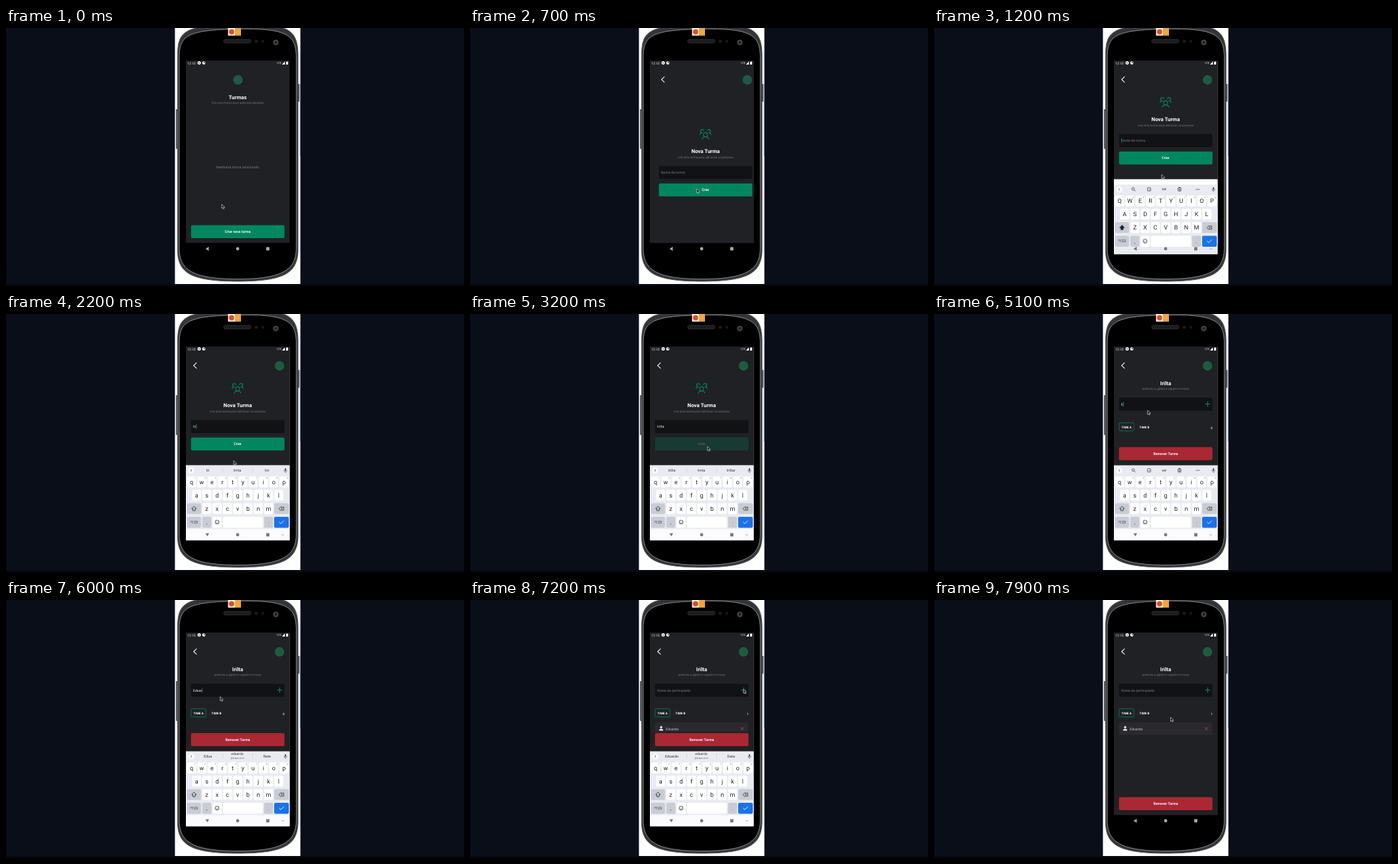
Recreate the animation shown at these times as an HTML page. Size 690x388 px, loop 8000 ms.

```html
<!DOCTYPE html>
<html lang="pt-BR">
<head>
<meta charset="utf-8">
<title>Turmas</title>
<style>
html, body { margin: 0; width: 100%; height: 100%; overflow: hidden; background: #0a0e18; }
svg { display: block; width: 100vw; height: 100vh; font-family: Roboto, Inter, sans-serif; text-rendering: geometricPrecision; }
</style>
</head>
<body>
<svg viewBox="0 0 690 388" preserveAspectRatio="none">
  <defs>
    <clipPath id="screen"><rect x="271" y="49" width="156.5" height="274.5"/></clipPath>
    <clipPath id="panel"><rect x="271" y="227.5" width="156.5" height="112.8"/></clipPath>
    <clipPath id="photo"><rect x="254.5" width="189" height="385"/></clipPath>
  </defs>
  <rect width="690" height="388" fill="#0a0e18"/>
  <rect y="385" width="690" height="3" fill="#060911"/>
  <g clip-path="url(#photo)">
    <rect x="254" width="190" height="385" fill="#fff"/>
    <rect x="256" y="122" width="2.600" height="60" rx="1" fill="#57575b"/>
    <rect x="439.500" y="84" width="2.400" height="27" rx="1" fill="#414145"/>
    <rect x="442.800" y="84" width="1" height="108" fill="#33353b"/>
    <path d="M258.500 40C259 5 268 -4 349 -6S439 5 440 40V335C439 368 420 381 349 381S259 368 258.500 335Z" fill="#343538" stroke="#5d5e62"/>
    <path d="M261 42C262 12 272 3 349 1.500S436 12 437.300 42V333C436 363 418 377.500 349 377.500S262 363 261 333Z" fill="#000" stroke="#98999c" stroke-width=".9"/>
  </g>
  <rect x="328" y="17" width="41" height="5.600" rx="2.800" fill="#1c1c1d" stroke="#38383a" stroke-width=".7"/>
  <g fill="#1b1b1d"><circle cx="377" cy="20" r="2.500"/><circle cx="387" cy="20" r="2"/></g>
  <circle cx="406.500" cy="21.700" r="3.700" fill="#3a3b3f" stroke="#55565a" stroke-width=".8"/>
  <circle cx="406.500" cy="21.700" r="1.600" fill="#19191c"/>
  <rect x="334.500" width="10.500" height="11.500" fill="#fff1e6"/>
  <circle cx="339.800" cy="5.700" r="4" fill="#d9502f"/>
  <rect x="345" width="9" height="11.500" fill="#f6a536"/>
  <g id="view"></g>
</svg>
<script>
const LOOP = 8000, STEP = 100, SCREEN_W = 157;
const GREEN = '#00875f', RED = '#aa2834', BG = '#202124', FIELD = '#121214';
const GROUP = 'Irilta', MEMBER = 'Eduardo';
const view = document.getElementById('view');
const ruler = document.createElement('canvas').getContext('2d');

const pointerPath = [
  [0, 325, 265], [400, 341, 304], [500, 341, 304], [800, 341.5, 220], [900, 341.5, 220],
  [1000, 343, 220.5], [2600, 343, 220.5], [3000, 357.7, 199.2], [3700, 357.7, 199.2],
  [4200, 321.7, 144.8], [5700, 321.7, 144.8], [5800, 322.7, 145.3], [6700, 322.7, 145.3],
  [7100, 412, 134], [7300, 412, 134], [7600, 393, 166], [7900, 356.5, 176.3], [8000, 356.5, 176.3]
];
// Moments at which each further letter appears.
const groupKeys = [1800, 2000, 2200, 2300, 2400, 2600];
const memberKeys = [5000, 5300, 5400, 5800, 6000, 6400, 6600];

const rect = (x, y, w, h, fill, rx = 0, extra = '') =>
  `<rect x="${x}" y="${y}" width="${w}" height="${h}" rx="${rx}" fill="${fill}" ${extra}/>`;
const circle = (x, y, r, fill, extra = '') => `<circle cx="${x}" cy="${y}" r="${r}" fill="${fill}" ${extra}/>`;
const line = (d, color, w = 1) =>
  `<path d="${d}" fill="none" stroke="${color}" stroke-width="${w}" stroke-linecap="round" stroke-linejoin="round"/>`;
const shape = (d, fill) => `<path d="${d}" fill="${fill}"/>`;
const group = (content, attrs) => `<g ${attrs}>${content}</g>`;
const shift = (x, y, content) => group(content, `transform="translate(${x} ${y})"`);

// y is the vertical centre of the capitals.
function text(s, x, y, size, fill, { anchor = 'middle', weight = 400 } = {}) {
  return `<text x="${x}" y="${y + size * 0.355}" font-size="${size}" fill="${fill}" text-anchor="${anchor}" font-weight="${weight}">${s}</text>`;
}
const left = { anchor: 'start' }, bold = { weight: 700 };

function typed(word, keys, t) {
  return word.slice(0, keys.filter(k => k <= t).length);
}

function caretOn(t, start, keys) {
  const last = [start, ...keys].filter(k => k <= t).pop();
  return last !== undefined && Math.floor((t - last) / 500) % 2 === 0;
}

// Offset of an incoming screen that decelerates for 300 ms.
const slide = (t, start) => SCREEN_W * (1 - Math.min(1, Math.max(0, (t - start) / 300))) ** 3;

function pointerAt(t) {
  const i = Math.max(1, pointerPath.findIndex(p => p[0] >= t));
  const [t0, x0, y0] = pointerPath[i - 1], [t1, x1, y1] = pointerPath[i];
  const p = (t - t0) / (t1 - t0), e = p * p * (3 - 2 * p);
  return [x0 + (x1 - x0) * e, y0 + (y1 - y0) * e];
}

const crest = x => circle(x, 78, 7.2, '#1d5b40');
const backArrow = line('M287 73.300L282.700 77.500L287 81.700', '#eee', 1.1);
const heading = (title, sub, y) => text(title, 349, y, 7.9, '#fff', bold) + text(sub, 349, y + 8.9, 4.5, '#77777c');

function button(label, y, fill, opacity = 1) {
  return group(rect(278.7, y, 140.8, 19.5, fill, 2) + text(label, 349, y + 9.8, 5.2, '#fff', bold), `opacity="${opacity}"`);
}

function field(value, hint, y, caret) {
  ruler.font = '52px Roboto, Inter, sans-serif';
  const end = 282 + ruler.measureText(value).width / 10;
  return rect(278.7, y, 140.8, 19.5, FIELD, 2) +
    text(value || hint, 282, y + 10, 5.2, value ? '#f2f2f2' : '#7c7c81', left) +
    (caret ? rect(end, y + 6, 0.9, 7.5, GREEN) : '');
}

function usersIcon(y) {
  const side = dir => `M${349 + dir * 2.6} ${y - 5}a2.500 2.500 0 1 ${dir > 0 ? 1 : 0} ${dir * 2.4} 3.100q${dir * 2.4} 0 ${dir * 3.7} 2.400`;
  return line(side(-1) + side(1), GREEN, 1.1) + circle(349, y + 1, 3.1, 'none', `stroke="${GREEN}" stroke-width="1.1"`) +
    line(`M343.900 ${y + 7.4}c2 -4.400 8.200 -4.400 10.200 0`, GREEN, 1.1);
}

function listScreen(t) {
  return rect(270.5, 49, 157, 275, BG) + crest(349.5) +
    heading('Turmas', 'Crie uma turma para adicionar pessoas', 104) +
    text('Nenhuma turma adicionada', 349, 209.3, 5.2, '#7c7c81') +
    button('Criar nova turma', 296.5, GREEN, t >= 400 ? 0.25 : 1);
}

function newScreen(t) {
  const open = t >= 1200, dy = open ? 0 : 48;
  const form = usersIcon(111.5) + heading('Nova Turma', 'crie uma turma para adicionar as pessoas', 137.5) +
    field(typed(GROUP, groupKeys, t), 'Nome da turma', 159.5, open && caretOn(t, 1000, groupKeys)) +
    button('Criar', 185.7, GREEN, t >= 3100 ? 0.25 : 1);
  return rect(270.5, 49, 157, 275, open ? '#fff' : BG) + rect(270.5, 49, 157, open ? 178.5 : 275, BG) +
    backArrow + crest(412) + shift(0, dy, form);
}

function memberCard() {
  return rect(278.7, 184, 140.8, 19, '#29292e', 2) + circle(288, 191.3, 1.7, '#e1e1e6') +
    shape('M284.800 196.600c0 -4 6.400 -4 6.400 0z', '#e1e1e6') +
    text(MEMBER, 295, 193.7, 5.3, '#c4c4cc', left) + line('M408.100 191.500l4.400 4.400m0 -4.400l-4.400 4.400', '#c9404a', 0.9);
}

function groupScreen(t) {
  const open = t >= 4400 && t < 7300, added = t >= 7200;
  const body = added ? memberCard() : open ? '' : text('Não há\u00a0 participante nesse time', 349, 223.3, 5.2, '#7c7c81');
  return rect(270.5, 49, 157, 275, open ? '#fff' : BG) + rect(270.5, 49, 157, open ? 178.5 : 275, BG) +
    backArrow + crest(412) + heading(GROUP, 'adicione a galera e separe os times', 104) +
    field(added ? '' : typed(MEMBER, memberKeys, t), 'Nome do participante', 126, open && caretOn(t, 4400, memberKeys)) +
    line('M408.600 135.500h7.200m-3.600 -3.600v7.200', GREEN, 1.1) +
    rect(279, 163.6, 22.2, 12.2, 'none', 1.5, `stroke="${GREEN}" stroke-width=".8"`) +
    text('TIME A', 290, 170, 4.6, '#fff', bold) + text('TIME B', 317, 170, 4.6, '#fff', bold) +
    text(added ? 1 : 0, 418.3, 171.7, 4.6, '#d0d0d4', bold) + body +
    (open ? rect(270.5, 198, 157, 29.5, BG) : '') + button('Remover Turma', open ? 200.2 : 296.5, RED);
}

function statusBar() {
  return text('12:10', 273.3, 53, 4.9, '#f0f0f0', left) +
    circle(291, 52.6, 2.5, '#fff') + circle(291, 52.6, 0.9, '#333') +
    circle(298, 52.6, 2.4, '#fff') + circle(298.7, 52, 0.9, '#333') +
    text('LTE', 411.5, 52.6, 4.3, '#ddd') + shape('M415.800 54.900h4.400v-4.600z', '#fff') +
    rect(422, 50.4, 3, 4.6, '#fff', 0.6);
}

function navIcons(color, down) {
  return shape(down ? 'M300.500 329.800h5.600l-2.800 4.700z' : 'M305.500 329v6l-5 -3z', color) +
    circle(349, 332, 2.4, color) + rect(392, 329.6, 4.8, 4.8, color, 0.5);
}

function strip(words) {
  const ink = '#50545b', ring = `stroke="${ink}" stroke-width=".9"`;
  const chevron = words ? 'M278.300 233.500l1.700 1.700l-1.700 1.700' : 'M279.800 233.500l-1.700 1.700l1.700 1.700';
  const mic = rect(419.9, 232, 2.2, 4, ink, 1.1) + line('M418.800 235.200c0 3 4.400 3 4.400 0M421 237.500v1', ink, 0.7);
  const base = circle(279, 235.2, 4.6, '#fff') + line(chevron, ink, 0.9) + mic;
  if (!words) {
    return base + circle(300, 234.5, 1.9, 'none', ring) + line('M301.500 236l1.700 1.800', ink, 0.9) +
      rect(321.5, 232.6, 5, 5, 'none', 1, ring) + circle(324.2, 235.5, 0.8, ink) +
      text('GIF', 346.8, 235.2, 4.3, ink, bold) +
      rect(367.7, 232.8, 4.4, 5, 'none', 0.6, ring) + rect(368.7, 231.8, 2.4, 2, ink) + rect(368.7, 235, 2.4, 1.6, ink) +
      [395.2, 397.3, 399.4].map(x => circle(x, 235.2, 0.75, ink)).join('');
  }
  const [a, b, c, note] = words;
  return base + text(a, 304, 235.2, 5.6, '#33363b') + text(c, 393.3, 235.2, 5.6, '#33363b') +
    (note ? text(b, 348.5, 231.7, 5, '#33363b') + text(note, 348.5, 237.7, 3.8, '#60646a') : text(b, 348.5, 235.2, 5.6, '#33363b')) +
    rect(326.3, 231.5, 0.5, 7.5, '#c3c5ca') + rect(371.3, 231.5, 0.5, 7.5, '#c3c5ca');
}

function keyboard(upper, words) {
  const pitch = 15.47, grey = '#c9ccd3', ink = '#222428';
  const key = (x, y, w, fill = '#fff') => rect(x - w / 2, y - 8.2, w, 16.4, fill, 2);
  const row = (letters, x0, y) => [...letters].map((ch, i) => {
    const x = x0 + i * pitch;
    return key(x, y, 13.6) + text(upper ? ch.toUpperCase() : ch, x, y + 0.2, 9, ink) +
      (y < 260 ? text((i + 1) % 10, x + 5, y - 5.4, 3.3, '#666a70') : '');
  }).join('');
  const shiftArrow = `<path d="M283.300 289l3.600 3.800h-1.900v3h-3.400v-3h-1.900z" fill="${upper ? ink : 'none'}" stroke="${ink}" stroke-width=".8"/>`;
  return rect(270.5, 228, 157, 113, '#e9ebf1') + strip(words) +
    row('qwertyuiop', 279.5, 252.5) + row('asdfghjkl', 287.2, 272.4) + row('zxcvbnm', 302.6, 292.6) +
    key(283.3, 292.6, 21, grey) + shiftArrow + key(415, 292.6, 22, grey) +
    line('M411.300 292.700l2 -2.400h5.200v4.800h-5.200zM414.600 291.600l2.200 2.200m0 -2.200l-2.200 2.200', ink, 0.7) +
    key(283.3, 313.2, 21, grey) + text('?123', 283.3, 313, 5.4, ink) +
    key(302.6, 313.2, 13.6, grey) + text(',', 302.6, 314, 7, ink) + key(318, 313.2, 13.6) +
    circle(318, 313, 3, 'none', `stroke="${ink}" stroke-width=".7"`) +
    circle(316.9, 312.2, 0.45, ink) + circle(319.1, 312.2, 0.45, ink) + line('M316.500 314c.7 1 2.300 1 3 0', ink, 0.6) +
    key(356.8, 313.2, 60) + key(395.5, 313.2, 13.6, grey) + text('.', 395.5, 314, 7, ink) +
    key(415, 313.2, 22, '#1a73e8') + line('M411.800 313.200l2.200 2.200l4.300 -4.400', '#fff', 0.9);
}

function keyboardState(t) {
  if (t >= 1200 && t < 3600) return t < 1300 ? 7.5 : t < 3500 ? 0 : 55;
  if (t >= 4500 && t < 7400) return t < 4600 ? 7.5 : t < 7300 ? 0 : 55;
  return null;
}

function suggestions(t) {
  const naming = t < 4000, word = naming ? typed(GROUP, groupKeys, t) : typed(MEMBER, memberKeys, t);
  if (word.length < 2) return null;
  if (naming) return [word, 'Irrita', word + 'r'];
  return [t >= 5800 && t < 6400 ? MEMBER.slice(0, 4) : word, MEMBER.toLowerCase(), t < 6600 ? 'Rate' : 'Data', '@lorpa.com'];
}

function keyboardLayer(t) {
  const dy = keyboardState(t);
  if (dy === null) return rect(270.5, 323.5, 157, 18, '#000') + navIcons('#a9a9ac', false);
  const upper = t < groupKeys[0] || (t > 4000 && t < memberKeys[0]);
  const settled = dy === 0;
  return group(rect(270.5, 227.5, 157, 113, '#fff') + shift(0, dy, keyboard(upper, suggestions(t))) +
    (settled ? rect(270.5, 323.5, 157, 18, '#fbfbfd') : '') + navIcons('#75787d', settled) +
    line('M415.500 331.500l1.500 1.300l1.500 -1.300', '#8a8d92', 0.8), 'clip-path="url(#panel)"');
}

function toast(t) {
  if (t < 3600 || t >= 4900) return '';
  return group(rect(317.3, 53.4, 63.7, 15, '#2e7d32', 1.5) +
    text('Grupo criado com sucesso!', 349.2, 61, 4.5, '#fff', bold), `opacity="${t === 4800 ? 0.5 : 1}"`);
}

function pointer(t) {
  const [x, y] = pointerAt(t);
  return shift(x, y, '<path d="M0 0V6.200L1.500 5L2.500 7.100L3.600 6.600L2.700 4.600L4.600 4.500Z" fill="#111" stroke="#d8d8d8" stroke-width=".7" stroke-linejoin="round"/>');
}

function render(t) {
  let screens = '';
  if (t < 800) screens += listScreen(t);
  if (t > 500 && t < 3800) screens += shift(slide(t, 500), 0, newScreen(t));
  if (t > 3500) screens += shift(slide(t, 3500), 0, groupScreen(t));
  view.innerHTML = group(screens + statusBar() + toast(t), 'clip-path="url(#screen)"') + keyboardLayer(t) + pointer(t);
}

const begin = performance.now();
let shown = -1;
function tick() {
  const t = Math.floor(((performance.now() - begin) % LOOP) / STEP) * STEP;
  if (t !== shown) render(shown = t);
  requestAnimationFrame(tick);
}
tick();
</script>
</body>
</html>
```
